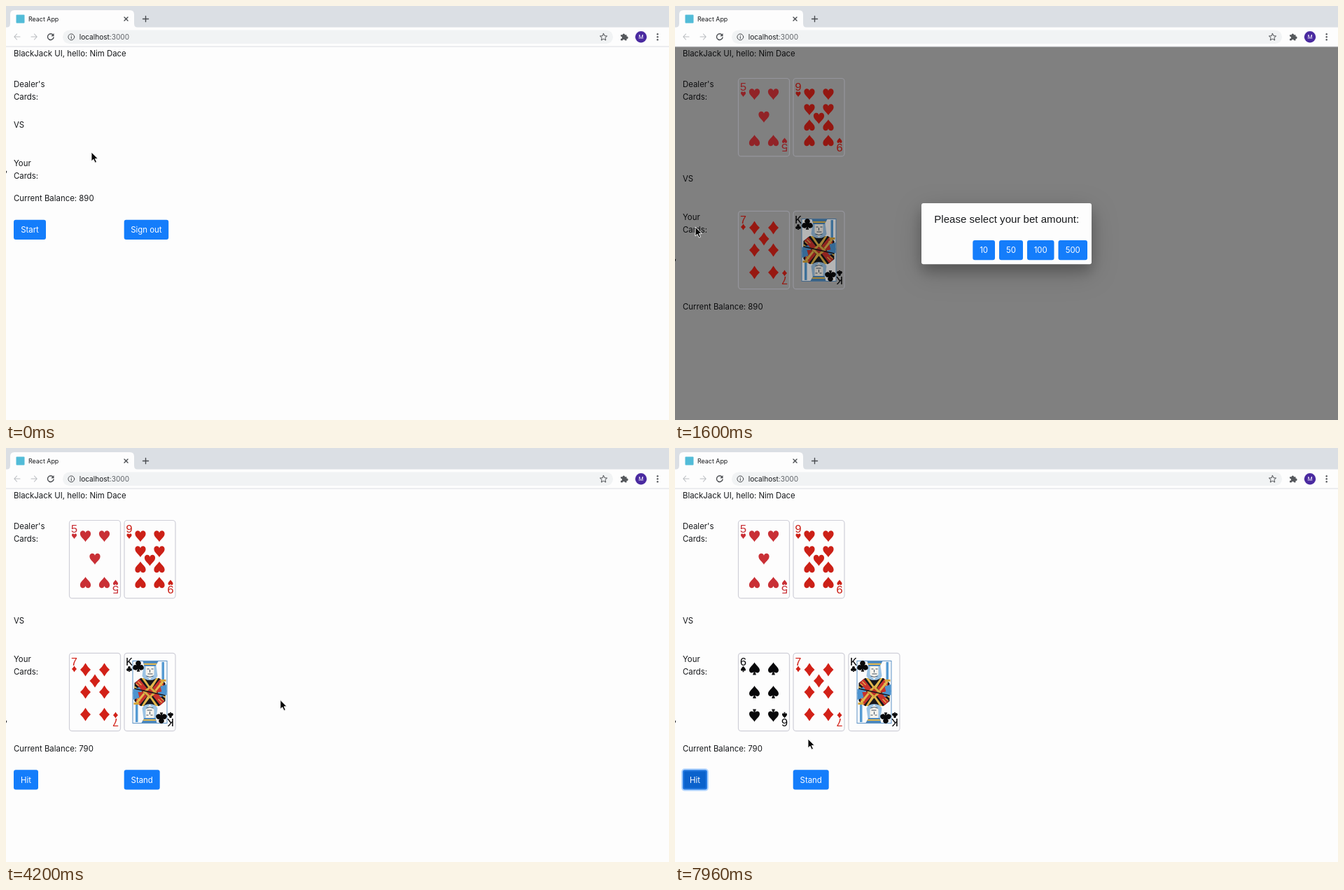
These frames come from a looping animation (947 by 592 pixels, 8 s). An HTML page:

```html
<!DOCTYPE html>
<html lang="en">
<head>
<meta charset="utf-8">
<title>React App</title>
<style>
  html, body { margin: 0; width: 100%; height: 100%; overflow: hidden; background: #fdfdfd; }
  svg { display: block; width: 947px; height: 592px; font: 11.4px Inter, "Open Sans", sans-serif; fill: #16181b; }
  .label { fill: #fff; text-anchor: middle; }
  .index { font: 16.5px "Liberation Mono", "DejaVu Sans Mono", monospace; text-anchor: middle; }
  .line { fill: none; stroke: #4a4d51; stroke-width: 1.4; stroke-linecap: round; stroke-linejoin: round; }
  .dialog { filter: drop-shadow(0 10px 9px #0003) drop-shadow(0 10px 18px #0003); }
</style>
</head>
<body>
<svg id="stage" viewBox="0 0 947 592" xmlns="http://www.w3.org/2000/svg"></svg>
<script>
const LOOP = 8000;
const BLUE = '#147dfb';
const BLUE_DARK = '#0b62cc';

// Moments at which the page changes, in ms
const T = { startPress: 860, dealt: 1320, loaded: 1540, betPress: 3920, bet: 3980, hitPress: 5960, drawn: 6360 };

const text = (x, y, str, attrs = '') => `<text x="${x}" y="${y}" ${attrs}>${str}</text>`;
const rect = (x, y, w, h, fill, r = 0, attrs = '') =>
  `<rect x="${x}" y="${y}" width="${w}" height="${h}" rx="${r}" fill="${fill}" ${attrs}/>`;
const path = (d, fill, attrs = '') => `<path d="${d}" fill="${fill}" ${attrs}/>`;
const group = (id, body, attrs = '') => `<g id="${id}" ${attrs}>${body}</g>`;

const button = (id, x, y, w, label) => group(id,
  rect(x, y, w, 28.3, BLUE, 3, 'stroke-opacity=".42" stroke-width="0"') +
  text(x + w / 2, y + 18.4, label, 'class="label"'));

const PIPS = {
  heart: 'M0 8C-2 4-7.6 1-7.6-3.5C-7.6-7-5.2-8-3.8-8C-1.8-8-.5-7 0-5C.5-7 1.8-8 3.8-8C5.2-8 7.6-7 7.6-3.5C7.6 1 2 4 0 8Z',
  diamond: 'M0-9.5Q3-4 7.5 0Q3 4 0 9.5Q-3 4-7.5 0Q-3-4 0-9.5Z',
  spade: 'M0-9C2-5 7.5-2 7.5 2.3C7.5 6.6 2.5 6.8.8 4.2L2.4 9H-2.4L-.8 4.2C-2.5 6.8-7.5 6.6-7.5 2.3C-7.5-2-2-5 0-9Z',
  club: 'M-2.8-1.6A4 4 0 1 1 2.8-1.6A4 4 0 1 1 .8 3.8L2.4 8.5H-2.4L-.8 3.8A4 4 0 1 1-2.8-1.6Z'
};

const pip = (suit, x, y, scale = 1, flip = y > 5) =>
  `<path d="${PIPS[suit]}" transform="translate(${x} ${y}) rotate(${flip ? 180 : 0}) scale(${scale})"/>`;
const twice = body => body + `<g transform="rotate(180)">${body}</g>`;
const row = y => [[-13.5, y], [13.5, y]];

const card = (id, x, y, rank, suit, color, face) => group(id,
  rect(-36.5, -55.7, 73, 111.4, 'none', 4, 'stroke="#cfcfd8" stroke-width="1.2"') +
  twice(text(-29.5, -38, rank, 'class="index"') + pip(suit, -29.5, -33, .47)) + face,
  `transform="translate(${x} ${y})" fill="${color}"`);
const spots = (suit, places) => places.map(([x, y]) => pip(suit, x, y)).join('');

function kingFace() {
  const half =
    path('M-22 0V-13L-13-20H13L22-13V0Z', '#17171c') +
    path('M-15-19L0 0H-10L-21-13Z M15-19L4-6 10 0H17L20-12Z', '#c8322b') +
    path('M-12-20L1-2 12-20 9-20 0-8-8-20Z', '#e3b84d') +
    path('M-22-9L-11 0H-14L-22-6Z M18-17L7-3 9-1 20-14Z', '#e3b84d') +
    path('M-24-4L-15-7-11-1-24 3Z M15-8L24-11V0H17Z', '#4d93cf') +
    path('M-9-38H9L11-23Q8-17 0-17T-11-23Z', '#9bc3e4') +
    path('M-6-38H6V-25L0-18-6-25Z', '#f7f3ec') +
    path('M-10-44H12L8-37H-8Z', '#4d88bd') +
    path('M-9-41H10L9-39H-8Z', '#e3b84d') +
    path('M-4-33H-1 M2-33H5 M0-32V-28 M-3-26H4 M-5-23Q0-20 5-23', 'none', 'stroke="#253b52" stroke-width=".9"') +
    path('M17-43H20.5V-17H17Z', '#559bd3') +
    path('M15-18H23V-15H15Z', '#d5a43c') +
    path('M-20-12L-16-9 M-17-15L-12-10 M14-13L18-9', 'none', 'stroke="#e3b84d" stroke-width="1.2"') +
    pip('club', -16.5, -37, .92);
  return rect(-24.5, -44.5, 49, 89, '#fbfbfb', 0, 'stroke="#5c92c5" stroke-width="1"') +
    twice(half) + path('M-10 0L0-9 10 0 0 9Z', '#d9aa43') +
    path('M-5 0L0-5 5 0 0 5Z', '#b92e29') +
    path('M-22-5L22 5', 'none', 'stroke="#17171c" stroke-width="1.5"');
}

const chrome =
  rect(0, 0, 947, 31, '#dbdfe4') +
  path('M0 31Q6 31 6 25V12Q6 6 12 6H177Q183 6 183 12V25Q183 31 189 31Z', '#fdfdfd') +
  rect(0, 30.5, 947, 27.5, '#fdfdfd') + rect(0, 57.5, 947, 1, '#dcdee1') +
  rect(14.5, 12.5, 12, 12, '#52bcd8', 1) +
  text(32, 21.6, 'React App', 'font-size="8.9"') +
  path('M169 16L174 21M174 16L169 21M195.5 18.5H203.5M199.5 14.5V22.5', 'none', 'class="line"') +
  path('M20 44H12M15.5 40L11.8 44 15.5 48M36 44H44M40.5 40L44.2 44 40.5 48', 'none', 'class="line" style="stroke:#b9bcc0;stroke-width:1.1"') +
  path('M67.2 41.5A4.3 4.3 0 1 0 68 45', 'none', 'class="line"') + path('M68.5 39V43.3H64.2Z', '#4a4d51') +
  rect(81, 34.5, 786, 19.5, '#f1f3f4', 9.7) +
  '<circle cx="93.3" cy="44.3" r="4.4" class="line" style="stroke-width:1"/>' +
  path('M93.3 43.8V46.5M93.3 42V42.1', 'none', 'class="line" style="stroke-width:1.1"') +
  text(104.7, 48, 'localhost<tspan fill="#5f6368">:3000</tspan>', 'font-size="10.1"') +
  path('M853.5 39.3L855 42.7 858.6 43 855.9 45.4 856.7 49 853.5 47.1 850.3 49 851.1 45.4 848.4 43 852 42.7Z', 'none', 'class="line" style="stroke-width:1"') +
  path('M878 41.2H880.6A1.7 1.7 0 1 1 884 41.2H886.5V43.5A1.7 1.7 0 1 1 886.5 46.8V49.3H884A1.6 1.6 0 1 0 880.8 49.3H878V46.7A1.6 1.6 0 1 0 878 43.6Z', '#55585c') +
  '<circle cx="907" cy="44.3" r="8.2" fill="#4a2aa0"/>' + text(907, 47.2, 'M', 'class="label" font-size="8"') +
  [40.3, 44.3, 48.3].map(y => `<circle cx="930.7" cy="${y}" r="1.2" fill="#55585c"/>`).join('');

const page =
  text(11, 72, 'BlackJack UI, hello: Nim Dace') +
  text(11, 116, "Dealer's") + text(11, 134, 'Cards:') +
  text(11, 174, 'VS', 'id="versus"') +
  group('yours', text(11, 229, 'Your') + text(11, 247, 'Cards:')) +
  text(11, 279, '', 'id="balance"') +
  text(-1, 0, ',', 'id="comma"') +
  group('lobby', button('start', 11, 305.7, 46, 'Start') + button('signOut', 168.7, 305.7, 63.5, 'Sign out')) +
  group('table', button('hit', 11, 460.3, 35, 'Hit') + button('stand', 168.7, 460.3, 51, 'Stand')) +
  group('slots', path('M90 103.3H242M90 215.5H242', 'none', 'stroke="#cfcfd6" stroke-width="1.5"'));

const cards =
  card('five', 127, 159.2, 5, 'heart', '#c93036', spots('heart', [...row(-33), [0, -.5], ...row(33)])) +
  card('nine', 205.5, 159.2, 9, 'heart', '#cc2017',
    spots('heart', [...row(-33), ...row(-11), [0, 1.5], ...row(11), ...row(33)])) +
  card('six', 127, 349, 6, 'spade', '#08080a', spots('spade', [...row(-33.5), ...row(0), ...row(33.5)])) +
  card('seven', 127, 349, 7, 'diamond', '#d22118', spots('diamond', [...row(-32), [0, -16], ...row(0), ...row(32)])) +
  card('king', 205.5, 349, 'K', 'club', '#08080a', kingFace());

const dialog =
  rect(352, 282, 243, 87.3, '#fdfdfd', 3, 'class="dialog"') +
  text(370.3, 310.2, 'Please select your bet amount:', 'style="font:15px \'Liberation Sans\',Arial,sans-serif;letter-spacing:.03px"') +
  button('bet10', 425.3, 335, 31.7, '10') + button('bet50', 463, 335, 34, '50') +
  button('bet100', 503, 335, 38.5, '100') + button('bet500', 547.5, 335, 41.5, '500');

const cursor =
  path('M0 0V13L3 10.3 5.2 15.2 7.5 14.2 5.3 9.4H9.3Z', '#080808', 'id="arrow" stroke="#fff" stroke-width=".9"') +
  path('M1.3 1.2Q2.5-.2 3.6 1.3L4.5 5Q5.8 4 6.6 5.3Q7.8 4.6 8.4 6Q9.8 5.6 10 7.4L9.8 10.5 8.6 13.6H3.6L-.5 9Q-1 7.4.6 7.5L2.3 8.7Z',
    '#fff', 'id="hand" stroke="#111" stroke-width="1"');

const stage = document.getElementById('stage');
stage.innerHTML = rect(0, 0, 947, 592, '#fdfdfd') + page +
  rect(0, 58, 947, 534, '#000', 0, 'id="shade"') + group('cards', cards) + chrome +
  group('dialog', dialog) + group('cursor', cursor);

const el = {};
stage.querySelectorAll('[id]').forEach(node => el[node.id] = node);

const clamp = v => Math.max(0, Math.min(1, v));
const ramp = (t, from, to) => clamp((t - from) / (to - from));
const between = (t, a, b) => t >= a && t < b;
const show = (node, on) => node.style.display = on ? '' : 'none';
const place = (node, x, y) => node.setAttribute('transform', `translate(${x} ${y})`);

const easeIn = k => k * k;
const easeOut = k => 1 - (1 - k) ** 2;
const smooth = k => k * k * (3 - 2 * k);
const linear = k => k;

// Pointer route: time, x, y, easing of the leg that ends there
const route = [
  [0, 122, 209], [600, 29, 316, smooth], [2240, 29, 316, linear], [2720, 355, 310, easeIn],
  [3160, 529, 354, easeOut], [4040, 529, 354, linear], [4200, 393, 360, easeIn],
  [4820, 34, 470, easeOut], [7280, 34, 470, linear], [7560, 97, 445, easeIn], [7960, 190, 416, easeOut]
];

function pointer(t) {
  const i = route.findIndex(stop => stop[0] > t);
  if (i < 0) return route[route.length - 1].slice(1, 3);
  const [t0, x0, y0] = route[i - 1], [t1, x1, y1, ease] = route[i];
  const k = ease(ramp(t, t0, t1));
  return [x0 + (x1 - x0) * k, y0 + (y1 - y0) * k];
}

function focus(node, on) {
  const box = node.firstChild;
  box.setAttribute('fill', on ? BLUE_DARK : BLUE);
  box.setAttribute('stroke', '#4d9dff');
  box.setAttribute('stroke-width', on ? 4 : 0);
}

function draw(t) {
  const loaded = t >= T.loaded, bet = t >= T.bet, drawn = t >= T.drawn;

  place(el.versus, 0, loaded ? 77 : 0);
  place(el.yours, 0, loaded ? 77 : 0);
  place(el.balance, 0, loaded ? 154.7 : 0);
  el.balance.textContent = `Current Balance: ${bet ? 790 : 890}`;
  el.comma.setAttribute('y', t < T.dealt ? 237 : !loaded ? 208 : bet ? 391 : 363);
  show(el.lobby, t < T.dealt);
  show(el.table, bet);
  show(el.slots, between(t, T.dealt, T.loaded));

  show(el.cards, loaded);
  show(el.six, drawn);
  place(el.seven, drawn ? 205.5 : 127, 349);
  place(el.king, drawn ? 284.5 : 205.5, 349);

  // The backdrop trails the dialog slightly in both directions
  const shade = smooth(ramp(t, 1350, 1560)) * (1 - ramp(t, 4030, 4180));
  const panel = ramp(t, T.dealt, 1435) * (1 - ramp(t, 3990, 4190));
  el.shade.setAttribute('opacity', shade * .495);
  el.cards.style.filter = shade ? `brightness(${1 - .28 * shade})` : 'none';
  el.dialog.setAttribute('opacity', panel);
  show(el.dialog, panel > 0);

  focus(el.start, t >= T.startPress);
  focus(el.bet100, t >= T.betPress);
  focus(el.hit, t >= T.hitPress);

  place(el.cursor, ...pointer(t));
  const hand = between(t, 520, T.dealt) || between(t, 3080, 3990) || between(t, 4740, 7360);
  show(el.hand, hand);
  show(el.arrow, !hand);
}

const begin = performance.now();
function tick() {
  draw((performance.now() - begin) % LOOP);
  requestAnimationFrame(tick);
}
tick();
</script>
</body>
</html>
```
